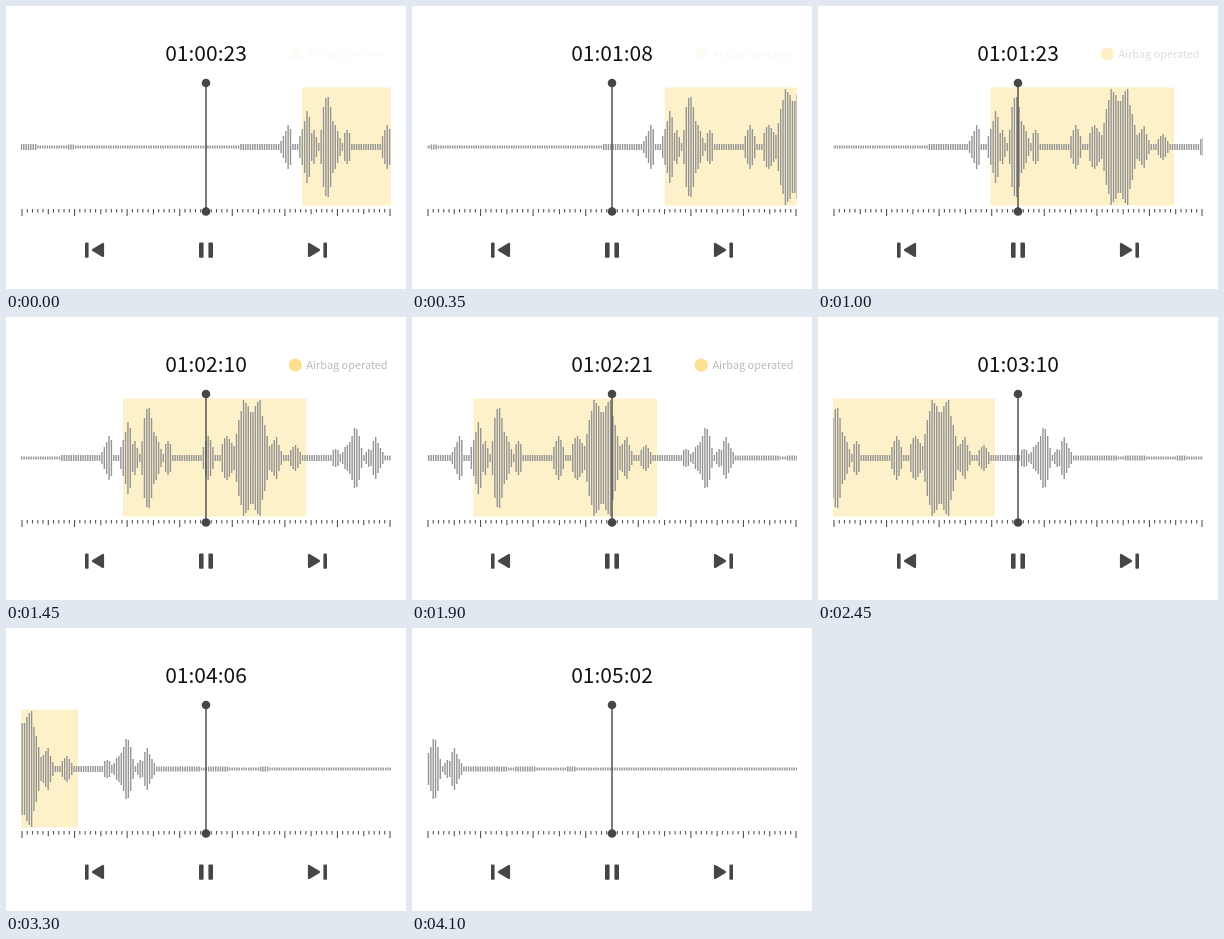
Write an HTML page that moves like this. It is 400 px wide and 283 px high and loops after 4150 ms.

```html
<!DOCTYPE html>
<html lang="en">
<head>
<meta charset="utf-8">
<title>Audio player</title>
<style>
  html, body { margin: 0; width: 100%; height: 100%; overflow: hidden; background: #fff; }
  svg { display: block; width: 100vw; height: 100vh; }
  text { font-family: "Noto Sans CJK KR", "Noto Sans CJK JP", "Noto Sans CJK SC", "Noto Sans", sans-serif; font-weight: 500; }
</style>
</head>
<body>
<svg viewBox="0 0 400 283">
  <defs><clipPath id="window"><rect x="15" y="60" width="370" height="145"/></clipPath></defs>
  <g clip-path="url(#window)">
    <g id="track">
      <rect y="81.5" width="183.5" height="118" fill="#fdf1c9"/>
      <path id="wave" stroke="#949494" stroke-width="1.4"/>
    </g>
  </g>
  <path id="ruler" stroke="#555" stroke-width="1.1"/>
  <g fill="#464646">
    <path d="M200 77V205.5" stroke="#505050" stroke-width="1.5"/>
    <circle cx="200" cy="77" r="4.3"/>
    <circle cx="200" cy="205.5" r="4.3"/>
    <g id="skip">
      <rect x="79" y="236.5" width="3.6" height="15.3" rx="1"/>
      <path d="M97 238V250L87 244Z" stroke="#464646" stroke-width="2.2" stroke-linejoin="round"/>
    </g>
    <use href="#skip" transform="matrix(-1 0 0 1 400 0)"/>
    <rect x="193" y="236.5" width="4.6" height="15.3" rx="1"/>
    <rect x="202.4" y="236.5" width="4.6" height="15.3" rx="1"/>
  </g>
  <text id="clock" x="200" y="55" font-size="21" text-anchor="middle" fill="#111"></text>
  <g id="label">
    <circle cx="289.3" cy="48" r="6.6" fill="#fdd874"/>
    <text x="300.5" y="52" font-size="10.9" fill="#aaa">Airbag operated</text>
  </g>
</svg>
<script>
const LOOP = 4150, STEP = 50;
const PITCH = 2.36, MIDDLE = 141;
const byId = id => document.getElementById(id);

// Bar half-heights of each burst, keyed by the index of its first bar
const bursts = {
  "-11": [6, 11, 16, 22, 18],
  "-3": [11, 18, 26, 36, 30, 14, 17, 10, 4, 17, 40, 49, 50, 40, 26, 22, 16, 9, 4, 14, 17, 14],
  "32": [11, 17, 22, 18, 11],
  "40": [14, 20, 22, 19, 15, 12, 24, 38, 47, 58, 55, 52, 46, 46, 52, 56, 58,
         42, 33, 22, 12, 14, 18, 21, 13, 7],
  "69": [8, 11, 13, 10, 6],
  "87": [8, 9, 8, 4, 6, 11, 13, 16, 22, 30, 29, 22, 10, 3, 6, 9, 8, 17, 21, 15, 10, 6]
};

function quietHeight(i) {
  const within = (a, b) => i >= a && i <= b;
  if (i <= -115 || within(-28, 86)) return 3;
  if (within(-101, -99) || within(87, 127) || within(131, 139) || within(153, 156)) return 2.5;
  return 1.5;
}

function wavePath() {
  const heights = {};
  for (const [first, list] of Object.entries(bursts))
    list.forEach((h, k) => heights[+first + k] = h);
  let d = "";
  for (let i = -125; i < 260; i++) {
    const h = heights[i] ?? quietHeight(i);
    d += `M${(5 + i * PITCH).toFixed(2)} ${MIDDLE - h}v${2 * h}`;
  }
  return d;
}

function rulerPath() {
  let d = "";
  for (let i = 0; i <= 70; i++) {
    const length = i % 10 === 0 ? 7 : i % 5 === 0 ? 5.2 : 3.6;
    d += `M${(16 + i * 368 / 70).toFixed(2)} 203v${length}`;
  }
  return d;
}

const fade = [[0, .06], [750, .09], [1000, .4], [1350, .8], [2200, .8], [2400, 0], [LOOP, 0]];

function labelOpacity(t) {
  const k = fade.findIndex(p => p[0] > t);
  const [t0, a] = fade[k - 1], [t1, b] = fade[k];
  return a + (b - a) * (t - t0) / (t1 - t0);
}

function timecode(t) {
  const ticks = Math.floor(23.7 + t * .024);
  const pad = n => String(n).padStart(2, "0");
  return `01:${pad(Math.floor(ticks / 24))}:${pad(ticks % 24)}`;
}

function draw(now) {
  const t = Math.floor(((now + 2) % LOOP) / STEP) * STEP;
  byId("track").setAttribute("transform", `translate(${296 - t * .1235} 0)`);
  byId("clock").textContent = timecode(t);
  byId("label").setAttribute("opacity", labelOpacity(t));
}

byId("wave").setAttribute("d", wavePath());
byId("ruler").setAttribute("d", rulerPath());
const start = performance.now();
function tick() {
  draw(performance.now() - start);
  requestAnimationFrame(tick);
}
tick();
</script>
</body>
</html>
```
